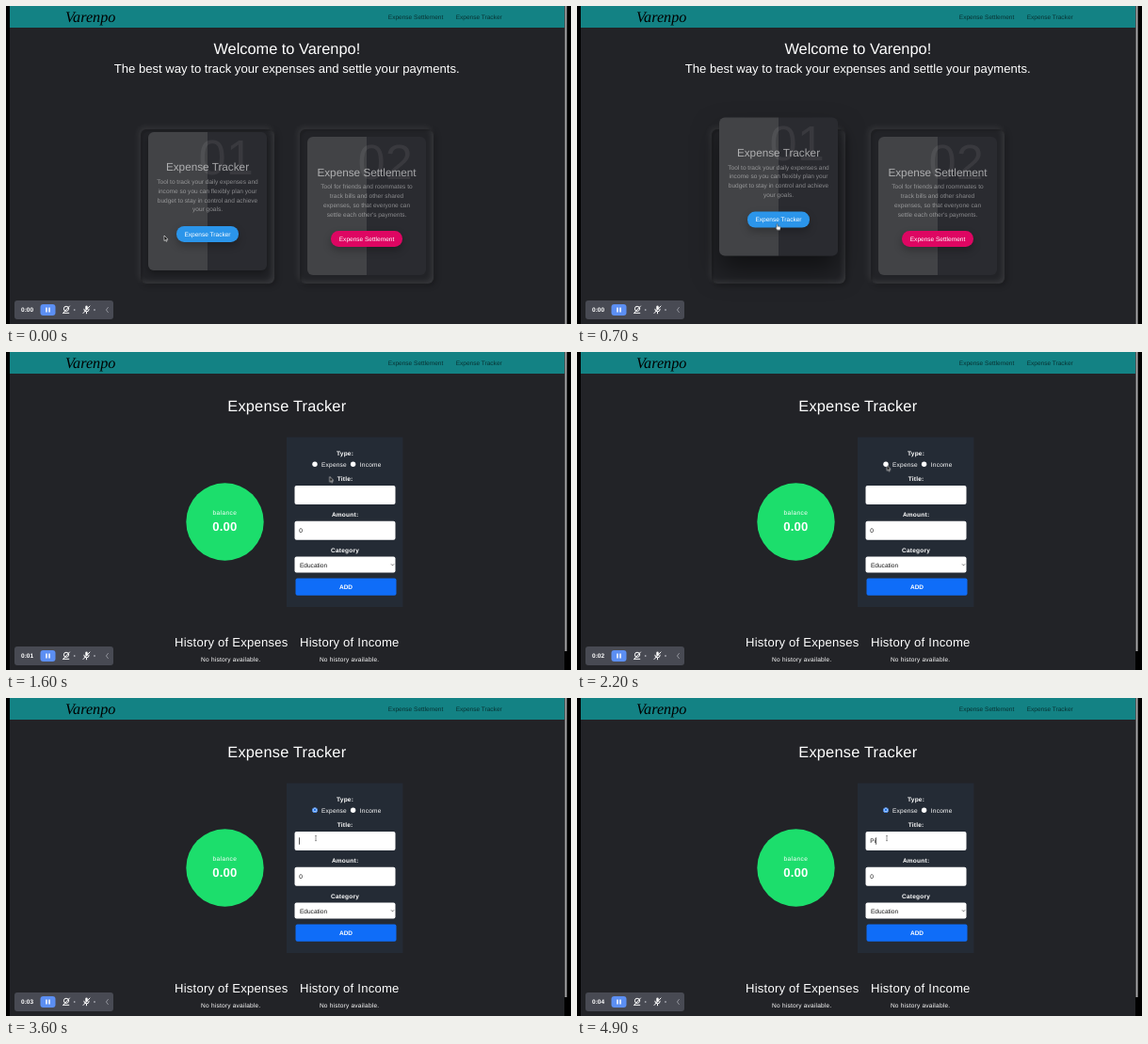
These frames come from a looping animation (600 by 338 pixels, 5 s). An HTML page:

```html
<!DOCTYPE html>
<html lang="en">
<head>
<meta charset="utf-8">
<title>Expense app walkthrough</title>
<style>
html, body { margin: 0; width: 100%; height: 100%; overflow: hidden; background: #000; }
.stage { position: relative; width: 600px; height: 338px; overflow: hidden; background: #000;
  font-family: "Liberation Sans", Arial, sans-serif; }
.page { position: absolute; left: 4px; top: 0; width: 589px; height: 338px; background: #222327; }
.layer, .screen { position: absolute; left: 0; top: 0; width: 600px; height: 338px; }
svg { display: block; overflow: visible; }
text { font-size: 6.54px; fill: #fff; text-rendering: geometricPrecision; }
.mid { text-anchor: middle; }
.bold { font-weight: 700; }
.h1 { font-size: 16.36px; }
.h2 { font-size: 13.1px; }
.brand { font: italic 16.2px "Liberation Serif", "Times New Roman", serif; fill: #000; }
.nav { fill: #000; fill-opacity: .62; }
.spaced text { letter-spacing: .22px; }
.dark { fill: #111; }
.spaced .field { letter-spacing: 0; }

/* Every animation shares one five second clock */
.anim, .home, .tracker { animation-duration: 5s; animation-iteration-count: infinite; animation-timing-function: step-end; }

/* Landing cards */
.card { position: absolute; top: 131px; width: 142px; height: 163.5px; border-radius: 6px;
  box-shadow: inset 2px 2px 2px rgba(0,0,0,.2), inset -2px -2px 6px rgba(255,255,255,.1),
    2px 2px 6px rgba(0,0,0,.3), -2px -2px 6px rgba(255,255,255,.1); }
.box { position: absolute; left: 8.2px; top: 8.2px; width: 126px; height: 147px; border-radius: 6px;
  background: linear-gradient(90deg, #424346 50%, #2a2b30 50%); }
.lift { animation-name: lift; }
.digits { font-size: 52.4px; fill-opacity: .07; }
.h3 { font-size: 11.75px; fill-opacity: .58; }
.copy { fill-opacity: .45; }
.pill { position: absolute; top: 100.3px; height: 16.4px; border-radius: 8.2px; box-shadow: 0 4px 8px rgba(0,0,0,.25); }
.box svg { position: absolute; left: 0; top: 0; }

.home { animation-name: home; }
.tracker { animation-name: tracker; }
.move { animation-name: move; }
.arrow { animation-name: arrow; }
.hand { animation-name: hand; }
.beam { animation-name: beam; }
.checked { animation-name: checked; }
.caret { animation-name: caret; }
.key1 { animation-name: key1; }
.key2 { animation-name: key2; }
.sec { opacity: 0; animation-name: sec; animation-delay: calc(var(--n) * 1s); }

@keyframes home { 0% { opacity: 1 } 16%, 100% { opacity: 0 } }
@keyframes tracker { 0% { opacity: 0 } 16%, 100% { opacity: 1 } }
@keyframes lift {
  0% { transform: translateY(-5.1px); box-shadow: 0 4px 7px rgba(0,0,0,.3) }
  2% { transform: translateY(-13.3px); box-shadow: 0 10px 18px rgba(0,0,0,.35) }
  4% { transform: translateY(-17.8px); box-shadow: 0 14px 24px rgba(0,0,0,.45) }
  6% { transform: translateY(-19.8px); box-shadow: 0 16px 28px rgba(0,0,0,.5) }
  8%, 100% { transform: translateY(-20.4px); box-shadow: 0 16px 28px rgba(0,0,0,.5) }
}
@keyframes move {
  0% { transform: translate(168px, 244px); animation-timing-function: steps(6) }
  12% { transform: translate(212px, 231.5px) }
  18% { transform: translate(212px, 231.5px); animation-timing-function: steps(7) }
  32% { transform: translate(343.7px, 132.5px); animation-timing-function: steps(7) }
  46% { transform: translate(326.7px, 118.5px) }
  54% { transform: translate(326.7px, 118.5px); animation-timing-function: steps(7) }
  68%, 100% { transform: translate(329px, 149px) }
}
@keyframes arrow { 0% { opacity: 1 } 8% { opacity: 0 } 20% { opacity: 1 } 66%, 100% { opacity: 0 } }
@keyframes hand { 0% { opacity: 0 } 8% { opacity: 1 } 20%, 100% { opacity: 0 } }
@keyframes beam { 0% { opacity: 0 } 66%, 100% { opacity: 1 } }
@keyframes checked { 0% { opacity: 0 } 60%, 100% { opacity: 1 } }
@keyframes caret {
  0% { opacity: 0; transform: none }
  68% { opacity: 1; transform: none }
  78% { opacity: 0; transform: none }
  86% { opacity: 1; transform: translateX(4.6px) }
  94%, 100% { opacity: 1; transform: translateX(6.1px) }
}
@keyframes key1 { 0% { opacity: 0 } 86%, 100% { opacity: 1 } }
@keyframes key2 { 0% { opacity: 0 } 94%, 100% { opacity: 1 } }
@keyframes sec { 0% { opacity: 1 } 20%, 100% { opacity: 0 } }
</style>
</head>
<body>
<div class="stage">
  <div class="page"></div>

  <div class="screen home">
    <svg class="layer">
      <rect x="593.5" width="2" height="338" fill="#a9aaac"/>
      <g class="mid">
        <text class="h1" x="298.3" y="51">Welcome to Varenpo!</text>
        <text class="h2" x="298.2" y="71">The best way to track your expenses and settle your payments.</text>
      </g>
    </svg>
    <div class="card" style="left:143px">
      <div class="box lift anim">
        <div class="pill" style="left:30px;width:66px;background:#2b95ea"></div>
        <svg width="126" height="147">
          <text class="digits" x="53.5" y="45">01</text>
          <g class="mid">
            <text class="h3" x="63" y="41.5">Expense Tracker</text>
            <g class="copy">
              <text x="63" y="55">Tool to track your daily expenses and</text>
              <text x="63" y="64.9">income so you can flexibly plan your</text>
              <text x="63" y="74.7">budget to stay in control and achieve</text>
              <text x="63" y="84.5">your goals.</text>
            </g>
            <text x="63" y="110.7">Expense Tracker</text>
          </g>
        </svg>
      </div>
    </div>
    <div class="card" style="left:312px">
      <div class="box">
        <div class="pill" style="left:25px;width:75.5px;background:#de0662"></div>
        <svg width="126" height="147">
          <text class="digits" x="53.5" y="45">02</text>
          <g class="mid">
            <text class="h3" x="63" y="41.5">Expense Settlement</text>
            <g class="copy">
              <text x="63" y="55">Tool for friends and roommates to</text>
              <text x="63" y="64.9">track bills and other shared</text>
              <text x="63" y="74.7">expenses, so that everyone can</text>
              <text x="63" y="84.5">settle each other's payments.</text>
            </g>
            <text x="63" y="110.7">Expense Settlement</text>
          </g>
        </svg>
      </div>
    </div>
  </div>

  <svg class="layer tracker spaced">
    <rect x="593.5" width="2" height="318" fill="#a9aaac"/>
    <text class="h1 mid" x="298.3" y="62.5">Expense Tracker</text>

    <circle cx="232.5" cy="180.5" r="41.2" fill="#1cde6c"/>
    <text class="mid" x="232.4" y="172.8" style="letter-spacing:.4px">balance</text>
    <text class="h2 bold mid" x="232.4" y="190">0.00</text>

    <rect x="298" y="90.5" width="123.5" height="180.5" fill="#242b35"/>
    <g class="mid bold">
      <text x="360.1" y="109.6">Type:</text>
      <text x="360.1" y="137.3">Title:</text>
      <text x="360.1" y="175.3">Amount:</text>
      <text x="360.1" y="213.2">Category</text>
    </g>
    <g fill="#fff">
      <circle cx="328" cy="119.2" r="2.7"/>
      <circle cx="368.6" cy="119.2" r="2.7"/>
    </g>
    <g class="checked anim">
      <circle cx="328" cy="119.2" r="2.7" fill="#1a6fe8"/>
      <circle cx="328" cy="119.2" r="2" fill="#fff"/>
      <circle cx="328" cy="119.2" r="1.4" fill="#1a6fe8"/>
    </g>
    <text x="335" y="122">Expense</text>
    <text x="375.8" y="122">Income</text>

    <g fill="#fff">
      <rect x="306.5" y="142" width="107" height="20" rx="2"/>
      <rect x="306.5" y="179.8" width="107" height="20" rx="2"/>
      <rect x="306.5" y="217.6" width="107" height="17" rx="2"/>
    </g>
    <text class="field dark key1 anim" x="311.3" y="154.3">P</text>
    <text class="field dark key2 anim" x="315.66" y="154.3">i</text>
    <rect class="caret anim" x="311.2" y="148.3" width=".7" height="7.4" fill="#111"/>
    <text class="field dark" x="311.2" y="192.3">0</text>
    <text class="field dark" x="312" y="228.5">Education</text>
    <path d="M409 225.4l1.5 1.5 1.5-1.5" fill="none" stroke="#333" stroke-width=".7"/>
    <rect x="307.5" y="240.5" width="107" height="18.3" rx="2" fill="#0f6df8"/>
    <text class="field bold mid" x="361" y="252.1">ADD</text>

    <g class="mid">
      <text class="h2" x="239.3" y="313">History of Expenses</text>
      <text class="h2" x="364.8" y="313">History of Income</text>
      <text x="238.8" y="328.8">No history available.</text>
      <text x="364.6" y="328.8">No history available.</text>
    </g>
  </svg>

  <svg class="layer">
    <rect x="4" width="589" height="23" fill="#138284"/>
    <text class="brand" x="63" y="16.5">Varenpo</text>
    <text class="nav" x="405.8" y="14">Expense Settlement</text>
    <text class="nav" x="477.7" y="14">Expense Tracker</text>

    <!-- Recorder bar -->
    <rect x="9" y="313" width="105" height="20" rx="3" fill="#484a53"/>
    <g class="bold">
      <text x="16" y="325.3">0:0</text>
      <text class="sec anim" style="--n:0" x="25.45" y="325.3">0</text>
      <text class="sec anim" style="--n:1" x="25.45" y="325.3">1</text>
      <text class="sec anim" style="--n:2" x="25.45" y="325.3">2</text>
      <text class="sec anim" style="--n:3" x="25.45" y="325.3">3</text>
      <text class="sec anim" style="--n:4" x="25.45" y="325.3">4</text>
    </g>
    <rect x="36.5" y="317" width="16" height="12" rx="3" fill="#5c8ff3"/>
    <path d="M43 320.5v5M46 320.5v5" stroke="#fff" stroke-width="1.5"/>
    <g fill="none" stroke="#fff" stroke-width="1" stroke-linecap="round">
      <circle cx="64" cy="321.8" r="2.6"/>
      <path d="M61.2 326.3h5.6M60.5 326.5l7-7.5"/>
      <path d="M82.8 322.2a2.7 2.7 0 0 0 5.4 0M85.5 325v1.8M82 326.5l7-7.5"/>
      <path d="M85.5 319.8v2.2" stroke-width="2.4"/>
      <path d="M108.4 320.4l-2 2.6 2 2.6" stroke="#a3a5ad" stroke-width=".8"/>
    </g>
    <g fill="#a3a5ad">
      <circle cx="72.7" cy="323" r=".9"/>
      <circle cx="94" cy="323" r=".9"/>
    </g>

    <!-- Pointer, with its hot spot at the origin -->
    <g class="move anim">
      <path class="arrow anim" d="M0 0v5.6l1.3-1.2.9 2 .9-.4-.9-1.9h1.8z" fill="#000" stroke="#fff" stroke-width=".6"/>
      <path class="hand anim" d="M0 .6q.6-.9 1.1 0v2l2.6.5q.7.2.6 1l-.6 2.6h-2.9l-2-2.4q0-.8.8-.5l.4.4z" fill="#fff" stroke="#111" stroke-width=".45"/>
      <path class="beam anim" d="M-1-2.8q1 0 1 .6v4.4q0 .6-1 .6M1-2.8q-1 0-1 .6M0 2.2q0 .6 1 .6" fill="none" stroke="#555" stroke-width=".6"/>
    </g>
  </svg>
</div>
</body>
</html>
```
